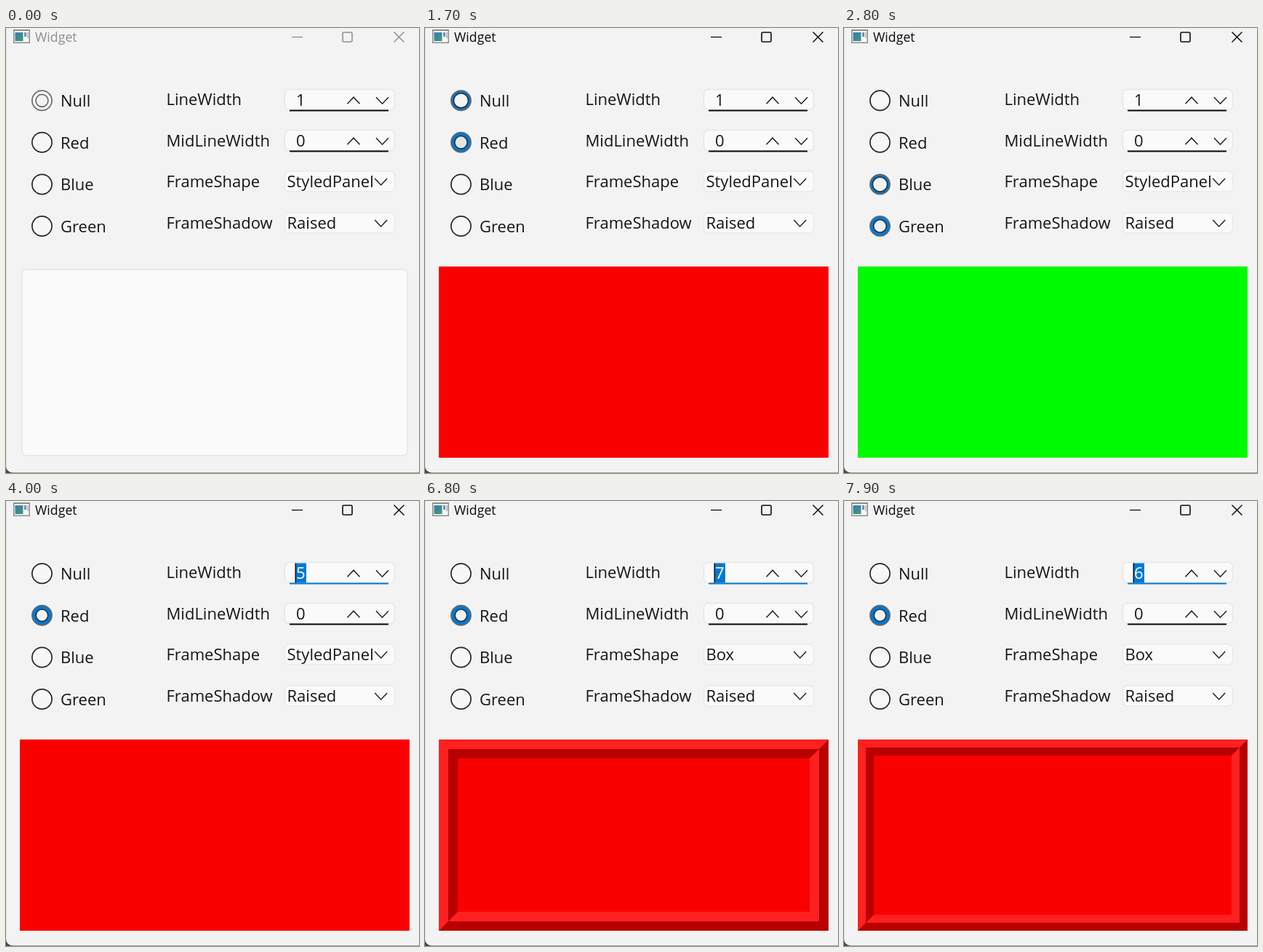
Write an HTML page with a canvas that moves like this. It is 568 px wide and 612 px high and loops after 8 s.

```html
<!DOCTYPE html>
<html lang="en">
<head>
<meta charset="utf-8">
<title>Widget</title>
<style>
html, body { margin: 0; width: 100%; height: 100%; overflow: hidden; background: #f3f3f3; }
canvas { display: block; }
</style>
</head>
<body>
<canvas id="stage" width="568" height="612"></canvas>
<script>
const ctx = document.getElementById('stage').getContext('2d');
const LOOP = 8000, STEP = 100;
const FONT = '"Open Sans", "Noto Sans", sans-serif';
const INK = '#161616', ACCENT = '#0078d4';
const RADIOS = ['Null', 'Red', 'Blue', 'Green'];
const RADIO_Y = [99.8, 157.3, 215, 272.5];
const SHAPES = ['NoFrame', 'Box', 'Panel', 'WinPanel', 'HLine', 'VLine', 'StyledPanel'];
const FILLS = [null, '#fb0000', '#0000fb', '#00fb00'];

// Each track holds [time, value] pairs; a value stays until the next pair.
const selected = [[0, 0], [1600, 1], [2200, 2], [2700, 3], [3100, 1]];
const hovered = [[0, -1], [400, 0], [900, -1], [1400, 1], [1900, -1], [2100, 2],
  [2700, 3], [2900, 1], [3500, -1]];
const lineWidth = [[0, 1], [3900, 3], [4000, 5], [6800, 7], [6900, 8], [7100, 11],
  [7300, 14], [7400, 16], [7600, 13], [7700, 10], [7800, 8], [7900, 6]];
const focused = [[0, false], [3900, true], [4900, false], [6800, true]];
const marked = [[0, 6], [5200, 0], [5300, 1], [5500, 2], [5800, 1]];

function entry(track, t) {
  let hit = track[0];
  for (const e of track) if (e[0] <= t) hit = e;
  return hit;
}
const at = (track, t) => entry(track, t)[1];

function text(s, x, y, color = INK, size = 22) {
  ctx.font = `${size}px ${FONT}`;
  ctx.fillStyle = color;
  ctx.fillText(s, x, y);
}

function rect(x, y, w, h, color) {
  ctx.fillStyle = color;
  ctx.fillRect(x, y, w, h);
}

function line(points, color, width) {
  ctx.beginPath();
  points.forEach(([x, y]) => ctx.lineTo(x, y));
  ctx.strokeStyle = color;
  ctx.lineWidth = width;
  ctx.stroke();
}

function poly(points, color) {
  ctx.beginPath();
  points.forEach(([x, y]) => ctx.lineTo(x, y));
  ctx.fillStyle = color;
  ctx.fill();
}

function box(x, y, w, h, r, fill, stroke, width = 1.5) {
  ctx.beginPath();
  ctx.roundRect(x, y, w, h, r);
  ctx.fillStyle = fill;
  ctx.fill();
  ctx.strokeStyle = stroke;
  ctx.lineWidth = width;
  ctx.stroke();
}

function disc(x, y, r, fill, stroke, width = 1.7) {
  ctx.beginPath();
  ctx.arc(x, y, r, 0, Math.PI * 2);
  ctx.fillStyle = fill;
  ctx.fill();
  ctx.strokeStyle = stroke;
  ctx.lineWidth = width;
  ctx.stroke();
}

const chevron = (x, y, dy) =>
  line([[x - 8.5, y - dy], [x, y + dy], [x + 8.5, y - dy]], '#222', 1.5);

function titleBar(active) {
  const color = active ? '#0c0c0c' : '#8f8f8f';
  rect(10, 2, 23, 19, '#8c8c8c');
  rect(11.5, 4, 20, 15.5, '#f8f8f8');
  const g = ctx.createLinearGradient(12, 6, 24, 18);
  g.addColorStop(0, '#3a78b4');
  g.addColorStop(1, '#3f9c78');
  rect(12.5, 6, 11, 12, g);
  rect(25, 6, 3, 6, '#7b8fa8');
  rect(29, 6, 2, 8, '#b9c3cf');
  text('Widget', 40, 19, color, 17.7);
  line([[393, 12.5], [408, 12.5]], color, 1.3);
  ctx.beginPath();
  ctx.roundRect(463, 6, 13, 13, 1.5);
  ctx.lineWidth = 1.6;
  ctx.stroke();
  line([[533.5, 5.5], [547.5, 19.5]], color, 1.5);
  line([[547.5, 5.5], [533.5, 19.5]], color, 1.5);
}

function radio(i, t, active) {
  const x = 49.5, y = RADIO_Y[i];
  const [since, now] = entry(selected, t);
  const before = since ? at(selected, since - 1) : -1;
  const hover = at(hovered, t) === i;
  const age = t - since;
  const leaving = i === before && age < 200;
  text(RADIOS[i], 75, y + 8.2);
  if (i !== now && !leaving) {
    disc(x, y, 13.6, hover ? '#e9e9e9' : '#f7f7f7', '#262626');
    return;
  }
  if (!active) {
    disc(x, y, 13.6, '#f6f6f6', '#6c6c6c');
    disc(x, y, hover ? 10 : 8.5, '#f3f3f3', '#6c6c6c');
    return;
  }
  let r = hover ? 8.7 : 8.2;
  if (leaving) r = 8.5 + age / 65;
  else if (since && age < 100) r = 7;
  disc(x, y, 13.6, ACCENT, '#686868');
  disc(x, y, r, hover && i !== 3 ? '#e4e4e4' : '#f3f3f3', '#18344c', 1.5);
}

function spin(y, value, focus) {
  box(383.5, y, 151, 28, 6, '#fafafa', '#e7e7e7');
  rect(390, y + 28, 136, 2, focus ? ACCENT : '#0a0a0a');
  if (focus) {
    ctx.font = `22px ${FONT}`;
    rect(398, y + 1, ctx.measureText(value).width + 2.4, 27, ACCENT);
    rect(397.5, y + 1, 1.5, 27, '#111');
  }
  text(value, 399, y + 22.5, focus ? '#fff' : INK);
  chevron(478, y + 15.2, -4.5);
  chevron(517.5, y + 15.2, 4.5);
}

function combo(y, value, hover) {
  box(383.5, y, 151, 28, 6, hover ? '#ececec' : '#fafafa', hover ? '#dedede' : '#eaeaea');
  text(value, 386.5, y + 22);
  chevron(515.7, y + 14.5, 4.5);
}

// One mitred band: top and left in one tone, bottom and right in the other.
function band(x, y, w, h, b, upper, lower) {
  const r = x + w, d = y + h;
  rect(x, y, w, h, lower);
  poly([[x, d], [x, y], [r, y], [r - b, y + b], [x + b, y + b], [x + b, d - b]], upper);
}

function panel(t) {
  const fill = FILLS[at(selected, t)];
  if (!fill) {
    box(22, 332, 530, 256, 6, '#fafafa', '#e8e8e8', 1.8);
    return;
  }
  const x = 19, y = 328, w = 536, h = 263;
  if (t < 6000) {
    rect(x, y, w, h, fill);
    return;
  }
  const b = Math.ceil(at(lineWidth, t) * 1.75), light = '#ff2020', dark = '#b80000';
  band(x, y, w, h, b, light, dark);
  band(x + b, y + b, w - 2 * b, h - 2 * b, b, dark, light);
  rect(x + 2 * b, y + 2 * b, w - 4 * b, h - 4 * b, fill);
}

function popup(t) {
  if (t < 4900 || t >= 6000) return;
  const h = 228 * Math.min(1, (t - 4800) / 200);
  ctx.save();
  ctx.beginPath();
  ctx.rect(379, 229, 161, h + 1);
  ctx.clip();
  rect(383, 235, 156, 223.5, '#666');
  rect(381, 230, 156, 227, '#f9f9f9');
  const top = i => 233 + i * 32.35;
  const m = at(marked, t);
  rect(384, top(6) - 1, 151, 28, '#f5f5f5');
  rect(381, top(m), 2.5, 26.5, ACCENT);
  SHAPES.forEach((s, i) => text(s, 395.5, top(i) + 21));
  ctx.restore();
}

function draw(t) {
  const active = t >= 600;
  rect(0, 0, 568, 612, '#4a4a4a');
  ctx.beginPath();
  ctx.roundRect(0, -10, 580, 621.5, 9);
  ctx.fillStyle = '#f3f3f3';
  ctx.fill();
  rect(0, 0, 1, 602, '#e2e2e2');
  titleBar(active);
  RADIOS.forEach((_, i) => radio(i, t, active));
  ['LineWidth', 'MidLineWidth', 'FrameShape', 'FrameShadow']
    .forEach((s, i) => text(s, 220.5, 106 + i * 56.7));
  spin(84.5, String(at(lineWidth, t)), at(focused, t));
  spin(140.5, '0', false);
  combo(197, t < 6000 ? 'StyledPanel' : 'Box', t >= 4800 && t < 6100);
  combo(254, 'Raised', false);
  panel(t);
  popup(t);
}

const start = performance.now();
function tick() {
  const t = (performance.now() - start) % LOOP;
  draw(Math.floor(t / STEP) * STEP);
  requestAnimationFrame(tick);
}
tick();
</script>
</body>
</html>
```
